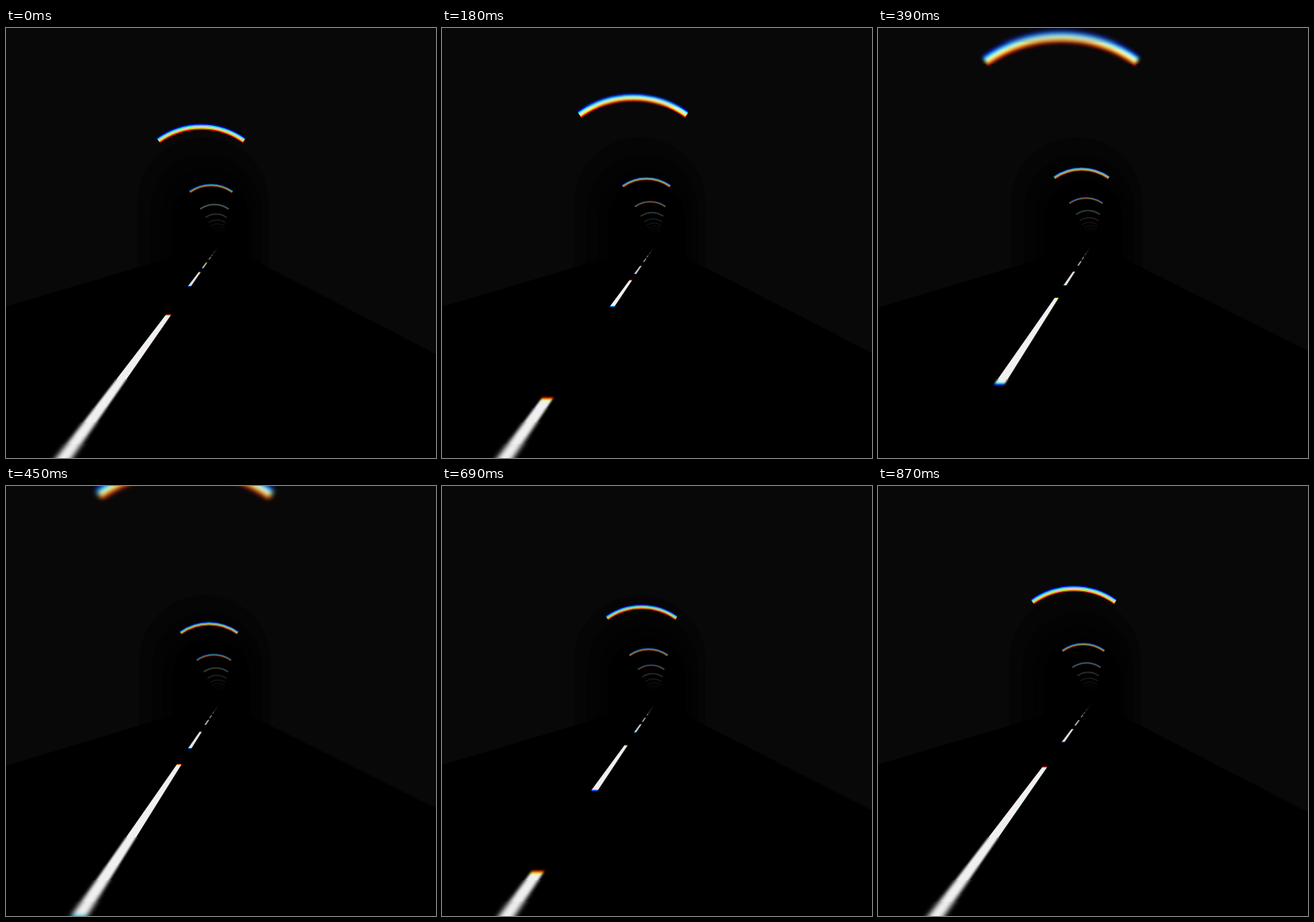
Recreate the animation shown at these times as an HTML page with a canvas. Size 540x540 px, loop 0.9 s.

```html
<!DOCTYPE html>
<html lang="en">
<head>
<meta charset="utf-8">
<title>Tunnel</title>
<style>
  html, body { margin: 0; width: 100%; height: 100%; overflow: hidden; background: #000; }
  canvas { display: block; width: 540px; height: 540px; }
</style>
</head>
<body>
<canvas id="stage" width="540" height="540"></canvas>
<script>
const SIZE = 540, MID = SIZE / 2, PAD = 30;
const LOOP = 900, STEP = 30;

// Tunnel measurements at depth 1; everything divides by depth.
const FLOOR = 33.8, HALF = 90, SPRING = -55;
const LAMP = { z: 0.993, radius: 92, y: -53, half: 53.5, thick: 5 };
const DASHES = [[0.068, 0.373], [0.624, 0.924]];
const DASH_HALF = 1.25;
const FADE = [[1.09, 5], [1.3, 3], [1.55, 2], [1.85, 0]];
const FRINGE = 0.01;
const CHANNELS = [['#f00', 1 - FRINGE], ['#0f0', 1], ['#00f', 1 + FRINGE]];
const ROWS = 9, SHARP = 108, REACH = 12;

const out = document.getElementById('stage').getContext('2d');
const buffer = document.createElement('canvas');
buffer.width = buffer.height = SIZE + PAD * 2;
const ctx = buffer.getContext('2d');

const glow = z => 0.94 * Math.min(1, Math.exp(-0.42 * (z - 0.6)));
const softness = d => 3.6 * Math.pow(d / MID, 3.5);

function polygon(...points) {
  ctx.beginPath();
  points.forEach(([x, y]) => ctx.lineTo(x, y));
  ctx.fill();
}

function drawWalls(cx) {
  ctx.fillStyle = '#080808';
  ctx.fillRect(-MID - PAD, -MID - PAD, buffer.width, buffer.height);
  for (const [z, v] of FADE) {
    ctx.fillStyle = `rgb(${v},${v},${v})`;
    ctx.beginPath();
    ctx.moveTo((cx - HALF) / z, FLOOR / z);
    ctx.arc(cx / z, SPRING / z, HALF / z, Math.PI, 0);
    ctx.lineTo((cx + HALF) / z, FLOOR / z);
    ctx.fill();
  }
  const near = 0.08;
  ctx.fillStyle = '#000';
  polygon([0, 0], [(cx + HALF) / near, FLOOR / near], [(cx - HALF) / near, FLOOR / near]);
}

function drawLamp(cx, z) {
  const spread = Math.asin(LAMP.half / LAMP.radius);
  ctx.globalAlpha = glow(z);
  ctx.lineWidth = LAMP.thick / z;
  ctx.beginPath();
  ctx.arc(cx / z, LAMP.y / z, LAMP.radius / z, -Math.PI / 2 - spread, -Math.PI / 2 + spread);
  ctx.stroke();
}

function drawDash(cx, near, far) {
  if (far < 0.1) return;
  near = Math.max(near, 0.1);
  const l = cx - DASH_HALF, r = cx + DASH_HALF;
  ctx.globalAlpha = glow((near + far) / 2);
  polygon([l / near, FLOOR / near], [r / near, FLOOR / near],
          [r / far, FLOOR / far], [l / far, FLOOR / far]);
}

function drawScene(p) {
  const cx = -23.5 - 1.2 * Math.cos(p * 2 * Math.PI);
  ctx.setTransform(1, 0, 0, 1, MID + PAD, MID + PAD);
  ctx.globalAlpha = 1;
  ctx.globalCompositeOperation = 'source-over';
  drawWalls(cx);

  ctx.globalCompositeOperation = 'lighter';
  for (const [color, scale] of CHANNELS) {
    ctx.setTransform(scale, 0, 0, scale, MID + PAD, MID + PAD);
    ctx.fillStyle = ctx.strokeStyle = color;
    for (let n = 0; n < 10; n++) {
      const z = LAMP.z + n - p;
      if (z > 0.3) drawLamp(cx, z);
      for (const [a, b] of DASHES) drawDash(cx, a + n - p, b + n - p);
    }
  }
}

// Copies one band of the scene, blurred by its distance from the middle.
function copyBand(y, h, blur) {
  out.save();
  out.beginPath();
  out.rect(0, y, SIZE, h);
  out.clip();
  out.filter = blur ? `blur(${blur.toFixed(2)}px)` : 'none';
  out.drawImage(buffer, 0, y + PAD - REACH, buffer.width, h + REACH * 2,
                -PAD, y - REACH, buffer.width, h + REACH * 2);
  out.restore();
}

function render(p) {
  drawScene(p);
  copyBand(MID - SHARP, SHARP * 2, 0);
  for (let d = SHARP; d < MID; d += ROWS) {
    const blur = softness(d + ROWS / 2);
    copyBand(MID + d, ROWS, blur);
    copyBand(MID - d - ROWS, ROWS, blur);
  }
}

const start = performance.now();
let shown = -1;
function tick() {
  const step = Math.floor(((performance.now() - start) % LOOP) / STEP);
  if (step !== shown) {
    shown = step;
    render(step * STEP / LOOP);
  }
  requestAnimationFrame(tick);
}
tick();
</script>
</body>
</html>
```
